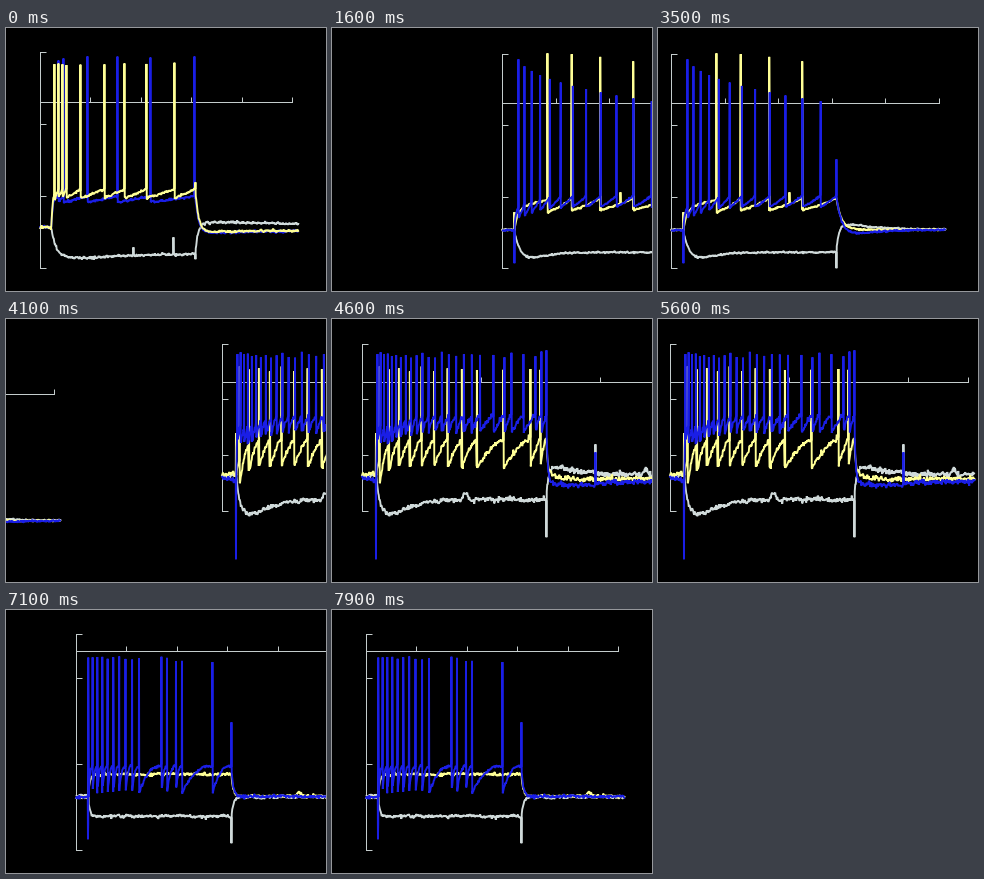
A matplotlib script for the animation above (8 s loop, 320 px wide and 263 px high).

```python
import numpy as np
import matplotlib.pyplot as plt
from matplotlib.animation import FuncAnimation

W, H, DPI = 320, 263, 100
FRAMES, STEP_MS = 80, 100
GAP = 450                                            # distance between panels
SLIDES = [(7, 22), (33.2, 48.1), (58.8, 74.05)]      # start and end, in frames
YELLOW, BLUE, WHITE, AXIS = "#ffff96", "#1a1ee6", "#d0dada", "#c4cccc"

fig = plt.figure(figsize=(W / DPI, H / DPI), dpi=DPI, facecolor="black")
ax = fig.add_axes([0, 0, 1, 1])
ax.set_xlim(0, W)
ax.set_ylim(H, 0)
ax.axis("off")
rng = np.random.default_rng(5)


def hump(t, peak):
    """Smooth bump that starts at 0 and reaches 1 at t = peak."""
    return t / peak * np.exp(1 - t / peak)


def train(n, first, gap, growth, extra=()):
    """Spike times whose gaps grow steadily, then a few late ones."""
    i = np.arange(n)
    return np.concatenate([first + gap * i + growth * i * i, extra])


def tops(times, low, high):
    return rng.uniform(low, high, len(times))


class Cell:
    """Recording with a current step between on and off."""

    def __init__(self, on, off, length, noise, wander=0.0):
        self.on, self.off, self.noise, self.wander = on, off, noise, wander
        self.x = np.arange(-0.5, length, 0.5)

    def step(self, rest, hold, tail, tau=(2, 2), sag=(0, 10), rebound=(0, 10)):
        """Exponential approach to hold, then back to tail."""
        def during(t):
            return hold + (rest - hold) * np.exp(-t / tau[0]) + sag[0] * hump(t, sag[1])

        span = self.off - self.on
        t = np.clip(self.x - self.on, 0, span)
        e = np.maximum(self.x - self.off, 0)
        after = tail + (during(span) - tail) * np.exp(-e / tau[1]) + rebound[0] * hump(e, rebound[1])
        return np.where(self.x > self.off, after, during(t))

    def bump(self, at, height, width=3):
        return height * np.exp(-((self.x - at) / width) ** 2)

    def trace(self, color, level, times=(), peaks=(), dip=0, power=1.0, marks=()):
        """Level plus noise, a ramp after each spike and thin vertical marks."""
        x, y = self.x, level.copy()
        for a, b in zip(times, [*times[1:], self.off]):
            seg = (x > a) & (x <= b)
            y[seg] += dip * (1 - (x[seg] - a) / (b - a)) ** power
        slow = np.convolve(rng.normal(0, 1, x.size + 12), np.ones(13) / 3.6, "valid")
        y += rng.normal(0, self.noise, x.size) + self.wander * slow
        pts = np.array([*zip(times, peaks), *marks]).reshape(-1, 2)
        x, y = np.append(x, pts[:, 0] + 0.2), np.append(y, pts[:, 1])
        order = np.argsort(x, kind="stable")
        return x[order] + 0.25, y[order] + 0.25, color, 1.9


def scale(y_ticks, y_zero, step):
    """Vertical scale with ticks to the right, time line with ticks upward."""
    strokes = [((0, 0), (y_ticks[0], y_ticks[-1])), ((0, 5 * step), (y_zero, y_zero))]
    strokes += [((0, 5.5), (y, y)) for y in y_ticks]
    strokes += [((i * step,) * 2, (y_zero, y_zero - 5)) for i in range(1, 6)]
    x, y = (np.array([[*s[k], np.nan] for s in strokes]).ravel() for k in (0, 1))
    return x, y, AXIS, 1


def panel_a():
    c = Cell(11, 155, 259, noise=0.75)
    burst = train(4, 14, 4, 0, (40, 64, 84, 106, 134))
    sparse = np.array([18, 23, 47, 77, 110, 154])
    return [
        scale([24, 96, 168, 240], 74, 50.4),
        c.trace(WHITE, c.step(199, 225.5, 196, (4, 2.5), (4, 28), (-2, 30)),
                marks=[(93, 219), (133, 209), (155, 231)]),
        c.trace(BLUE, c.step(199, 168, 203, (1.5, 3.2), rebound=(1.5, 16)),
                sparse, tops(sparse, 28, 33), dip=6),
        c.trace(YELLOW, c.step(199, 161, 202.5, (1.5, 3.2), rebound=(1, 16)),
                burst, tops(burst, 33, 37), dip=9, marks=[(155, 154)]),
    ]


def panel_b():
    c = Cell(12, 165, 275, noise=0.55)
    slow, fast = train(4, 45, 22, 2.2), train(12, 16, 5.4, 0.61)
    return [
        scale([26, 97, 169, 240], 75, 53.6),
        c.trace(WHITE, c.step(201.5, 224, 201, (7, 2), (8, 11), (-4.5, 14)),
                marks=[(12, 184), (165, 240)]),
        c.trace(YELLOW, c.step(202, 169, 201.5, (4, 5), (7, 11)),
                slow, 25 + 0.9 * np.arange(4) ** 2, dip=13, power=0.7,
                marks=[(12, 184), (118, 164)]),
        c.trace(BLUE, c.step(202, 167, 201.5, (2, 5), (9, 8), (4, 16)),
                fast, 31 + 42 * np.linspace(0, 1, 12) ** 0.75, dip=12, power=0.8,
                marks=[(12, 235), (165, 131)]),
    ]


def panel_c():
    c = Cell(14, 184, 305, noise=1.35, wander=0.5)
    slow = train(9, 17, 8.9, 0.41, (141, 168, 178))
    fast = train(19, 15, 3, 0.15, (131, 142, 149, 161, 173, 179))
    white = c.step(157, 180, 155, (3, 1.5), (15, 13), (-7, 10))
    return [
        scale([25, 80, 136, 192], 63, 59.6),
        c.trace(WHITE, white + c.bump(103, -6) + c.bump(283, -5),
                marks=[(184, 218), (233, 125)]),
        c.trace(YELLOW, c.step(155, 120, 159.5, (6, 1.5), rebound=(-3, 4)),
                slow, tops(slow, 47, 53), dip=28, power=1.4, marks=[(13.5, 114)]),
        c.trace(BLUE, c.step(160, 96, 162, (0.6, 1.2), (13, 8), (4, 20)),
                fast, tops(fast, 32, 39), dip=17, power=1.2,
                marks=[(13.5, 240), (184, 31), (233, 133)]),
    ]


def panel_d():
    c = Cell(12, 155, 259, noise=0.85, wander=0.35)
    fast = train(10, 11.8, 4.2, 0.16, (85, 90.5, 99.5, 105.5, 136))
    yellow = c.step(187, 164, 185.8, (1.5, 1.8))
    return [
        scale([24, 68, 154, 240], 41, 50.4),
        c.trace(WHITE, c.step(186, 206, 187, (1.5, 2)), marks=[(12, 160), (155, 233)]),
        c.trace(YELLOW, yellow + c.bump(223, -4), marks=[(12, 160)]),
        c.trace(BLUE, c.step(187, 156, 186, (0.6, 1.8)), fast, tops(fast, 45, 53),
                dip=28, power=2.5, marks=[(11.5, 229), (155, 112)]),
    ]


def add_panel(rest, curves):
    parts = []
    for z, (x, y, color, width) in enumerate(curves):
        line, = ax.plot([], [], color=color, lw=width * 72 / DPI, zorder=z,
                        solid_joinstyle="bevel", solid_capstyle="butt")
        parts.append((line, x, y))
    return rest, parts


def ease(u):
    u = min(max(u, 0), 1)
    return 2 * u * u if u < 0.5 else 1 - 2 * (1 - u) ** 2


panels = [add_panel(34, panel_a()), add_panel(26, panel_b()),
          add_panel(12, panel_c()), add_panel(34, panel_d())]


def draw(frame):
    scroll = GAP * sum(ease((frame - a) / (b - a)) for a, b in SLIDES)
    lines = []
    for k, (rest, parts) in enumerate(panels):
        left = round(rest + GAP * k - scroll)
        for line, x, y in parts:
            line.set_data(x + left, y)
            line.set_visible(-310 < left < W)
            lines.append(line)
    return lines


anim = FuncAnimation(fig, draw, frames=FRAMES, interval=STEP_MS, repeat=True,
                     repeat_delay=0, blit=False)
plt.show()
```
